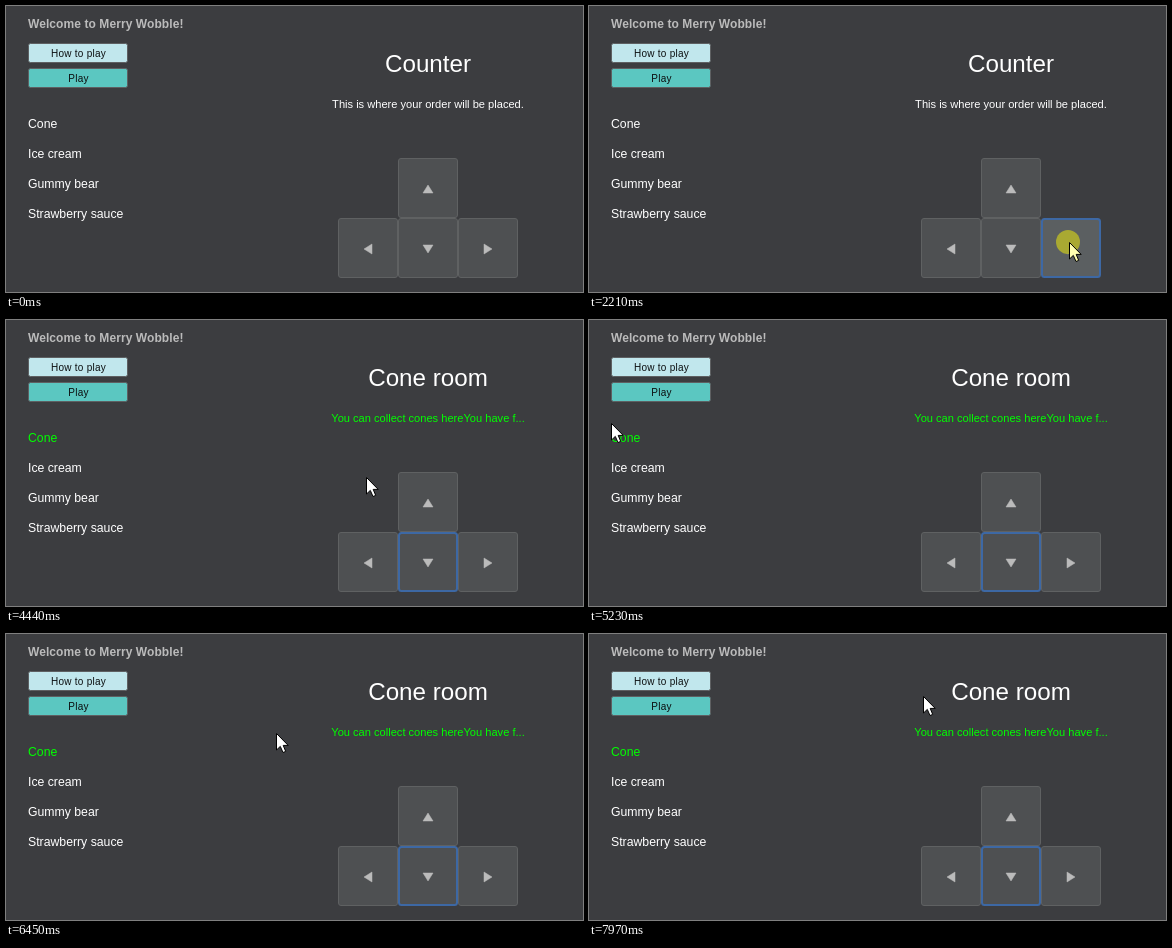
Recreate the animation shown at these times as an HTML page. Size 577 by 286 pixels, loop 8 s.

```html
<!DOCTYPE html>
<html lang="en">
<head>
<meta charset="utf-8">
<title>Counter</title>
<style>
  html, body { margin: 0; width: 100%; height: 100%; overflow: hidden; background: #3c3d40; }
  svg { display: block; width: 577px; height: 286px; font-family: "Liberation Sans", Arial, sans-serif; fill: #fff; }
  .welcome { font-size: 12px; font-weight: bold; letter-spacing: .08px; fill: #bbb; }
  .item { font-size: 12.25px; }
  .room { font-size: 24.2px; text-anchor: middle; }
  .hint { font-size: 11.1px; text-anchor: middle; }
  .label { font-size: 10px; letter-spacing: .27px; text-anchor: middle; fill: #0c0f10; }
  .menu { stroke: #5e6062; }
  .done { fill: #0f0; }
  .key rect { x: .5px; y: .5px; width: 59px; height: 59px; rx: 2.5px; fill: #4e5052; stroke: #5f6162; }
  .key path { fill: #bbb; stroke: #bbb; stroke-width: .5; }
  .key.hover rect { fill: #55595b; stroke: #3f6aa6; }
  .key.focus rect { x: 1px; y: 1px; width: 58px; height: 58px; stroke: #3d68a4; stroke-width: 2; }
  .key.press rect { fill: #5b5f61; }
  .pointer { fill: #fff; stroke: #000; stroke-linejoin: round; }
  .pointer.press { fill: #ffffb0; }
</style>
</head>
<body>
<svg viewBox="0 0 577 286">
  <text class="welcome" x="22" y="22">Welcome to Merry Wobble!</text>
  <rect class="menu" x="22.5" y="37.5" width="99" height="19" rx="2" fill="#c1e7ed"/>
  <text class="label" x="72.5" y="51">How to play</text>
  <rect class="menu" x="22.5" y="62.5" width="99" height="19" rx="2" fill="#5bc7c1"/>
  <text class="label" x="72.5" y="76">Play</text>

  <text class="item" id="cone" x="22" y="122">Cone</text>
  <text class="item" x="22" y="152">Ice cream</text>
  <text class="item" x="22" y="182">Gummy bear</text>
  <text class="item" x="22" y="212">Strawberry sauce</text>

  <text class="room" id="room" x="422" y="66"></text>
  <text class="hint" id="hint" x="422" y="102"></text>

  <g class="key" transform="translate(392 152)"><rect/><path d="M25 35L30 27L35 35Z"/></g>
  <g class="key" transform="translate(332 212)"><rect/><path d="M34 26L26 31L34 36Z"/></g>
  <g class="key" id="right" transform="translate(452 212)"><rect/><path d="M26 26L34 31L26 36Z"/></g>
  <g class="key" id="down" transform="translate(392 212)"><rect/><path d="M25 27L30 35L35 27Z"/></g>

  <g id="cursor">
    <circle id="click" cx="-1" r="12" fill="#a9a932"/>
    <path class="pointer" id="pointer" d="M.5 .5V17L4.3 13.4L7 19.5L9.7 18.4L7.2 12.4H12.2Z"/>
  </g>
</svg>
<script>
  const LOOP = 8000, STEP = 100;
  const $ = id => document.getElementById(id);

  const linear = p => p;
  const easeIn = p => p * p;
  const easeOut = p => 1 - (1 - p) ** 4;
  const mix = (a, b, p) => a + (b - a) * p;

  const line = (x0, y0, x1, y1) => p => [mix(x0, x1, p), mix(y0, y1, p)];
  // Angles in degrees, clockwise from the right.
  const arc = (cx, cy, rx, ry, from, to) => p => {
    const a = mix(from, to, p) * Math.PI / 180;
    return [cx + rx * Math.cos(a), cy + ry * Math.sin(a)];
  };

  // The pointer rests at the end of each move until the next one starts.
  const moves = [
    { start: 510, end: 910, ease: easeOut, path: line(489, 270, 480, 236) },
    { start: 2820, end: 3220, ease: easeOut, path: line(470, 231, 420, 231) },
    { start: 4440, end: 4630, ease: linear, path: line(360, 157, 185, 97) },
    { start: 4830, end: 5230, ease: easeOut, path: line(150, 97, 22, 103) },
    { start: 5230, end: 5630, ease: linear, path: arc(40, 108, 19, 14, 200, 450) },
    { start: 5730, end: 6250, ease: easeIn, path: arc(224, 127, 218, 30, 180, 270) },
    { start: 6450, end: 6550, ease: linear, path: line(270, 99, 333, 99) },
    { start: 6850, end: 7650, ease: linear, path: arc(433, 94.5, 124, 32.5, 190, 480) },
    { start: 7750, end: 7970, ease: linear, path: arc(334, 94.5, 34, 32.5, 120, 270) }
  ];

  const rooms = [
    { start: 0, name: "Counter", hint: "This is where your order will be placed." },
    { start: 2310, name: "Paper cupboard", hint: "You can collect paper cup here" },
    { start: 3920, name: "Cone room", hint: "You can collect cones hereYou have f..." }
  ];

  const latest = (list, t) => list.filter(entry => entry.start <= t).pop();
  const within = (t, from, to) => t >= from && t < to;

  function pointerAt({ start, end, ease, path }, t) {
    const steps = Math.round((end - start) / STEP);
    const p = Math.min(1, (t - start) / (end - start));
    return path(ease(Math.floor(p * steps + 1e-6) / steps));
  }

  function setKey(id, hover, focus, press) {
    const list = $(id).classList;
    list.toggle("hover", hover);
    list.toggle("focus", focus);
    list.toggle("press", press);
  }

  function draw(t) {
    const move = latest(moves, t);
    $("cursor").style.display = move ? "" : "none";
    if (move) {
      const [x, y] = pointerAt(move, t).map(Math.round);
      $("cursor").setAttribute("transform", `translate(${x} ${y})`);
    }

    const pressRight = within(t, 2210, 2310);
    const pressDown = within(t, 3720, 3920);
    const press = pressRight || pressDown;
    $("click").style.display = press ? "" : "none";
    $("pointer").classList.toggle("press", press);
    setKey("right", within(t, 510, 2920), within(t, 2210, 3720), pressRight);
    setKey("down", within(t, 2920, 4440), t >= 3720, pressDown);

    const room = latest(rooms, t);
    $("room").textContent = room.name;
    $("hint").textContent = room.hint;
    for (const id of ["cone", "hint"]) $(id).classList.toggle("done", t >= 3920);
  }

  const began = performance.now();
  function tick() {
    draw((performance.now() - began) % LOOP);
    requestAnimationFrame(tick);
  }
  tick();
</script>
</body>
</html>
```
